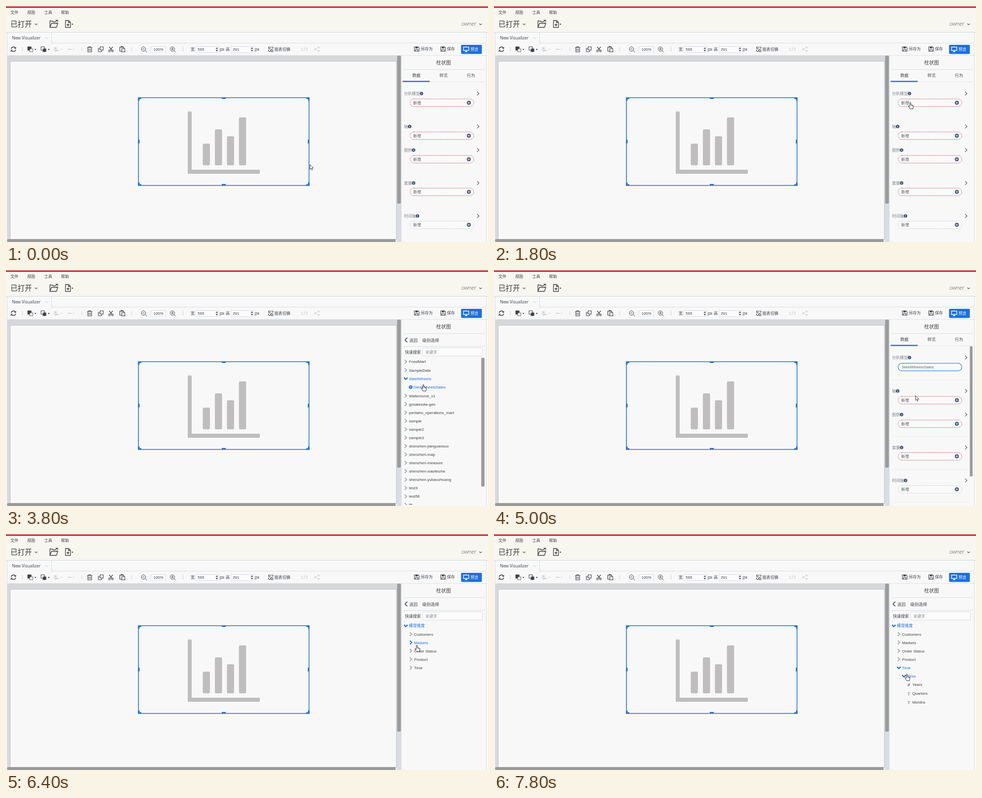
An HTML page that plays this animation: 976 px wide and 480 px high, repeating every 8 s.

```html
<!DOCTYPE html>
<html lang="zh-CN">
<head>
<meta charset="utf-8">
<title>New Visualizer</title>
<style>
html, body { margin: 0; width: 100%; height: 100%; overflow: hidden; background: #f8f8f8; }
svg { display: block; width: 976px; height: 480px; }
text { font-family: "Liberation Sans", "Noto Sans CJK SC", "Noto Sans CJK", sans-serif; white-space: pre; }
.os { font-family: "Open Sans", "Noto Sans CJK SC", sans-serif; }
</style>
</head>
<body>
<svg id="stage" viewBox="0 0 976 480">
  <defs><clipPath id="list"><rect x="801" y="176" width="170" height="302"/></clipPath></defs>
  <g id="base"></g>
  <g id="panel"></g>
  <g id="cursor"></g>
</svg>
<script>
const $ = id => document.getElementById(id);
const BLUE = '#1b6fe0', INK = '#3c3f45', PALE = '#d9dde2', GREY = '#9b9b9b', NAVY = '#3f4f70';

// Drawing helpers
const rect = (x, y, w, h, fill, more = '') =>
  `<rect x="${x}" y="${y}" width="${w}" height="${h}" fill="${fill}" ${more}/>`;
const path = (d, stroke, width = 1, fill = 'none', more = '') =>
  `<path d="${d}" stroke="${stroke}" stroke-width="${width}" fill="${fill}" ${more}/>`;
const text = (x, mid, s, size = 8, fill = INK, more = '') =>
  `<text x="${x}" y="${mid + size * 0.37}" font-size="${size}" fill="${fill}" ${more}>${s}</text>`;
const at = (x, y, body) => `<g transform="translate(${x} ${y})">${body}</g>`;
const caret = (x, y, c = INK) => path(`M${x - 2} ${y - 1}h4l-2 2.4z`, 'none', 0, c);
const vee = (x, y) => path(`M${x - 2.5} ${y - 1.2}l2.5 2.5l2.5 -2.5`, INK, 1.1);
const right = (x, y, c, w = 2) => path(`M${x - 2} ${y - 3.7}l3.7 3.7l-3.7 3.7`, c, w);
const down = (x, y) => path(`M${x - 3.6} ${y - 1.8}l3.6 3.6l3.6 -3.6`, BLUE, 2.2);
const middle = 'text-anchor="middle"';

function floppy(x, y) {
  return at(x, y,
    path('M-4.5 -4.5h7.5l2 2v7h-9.5z', INK, 1.1) +
    rect(-2.3, -4.5, 4.6, 3.2, INK) + path('M-2.5 4.5v-3.4h5v3.4', INK));
}

function zoom(x, y, plus) {
  return at(x, y,
    `<circle cx="-1" cy="-1" r="4.4" fill="none" stroke="${INK}"/>` +
    path('M2.2 2.2l3.6 3.6M-3.2 -1h4.4' + (plus ? 'M-1 -3.2v4.4' : ''), INK));
}

function sizeBox(x, value) {
  return rect(x, 82.5, 47, 12, '#fbfbfb', `stroke="${PALE}"`) + text(x + 3.5, 88.4, value) +
    path(`M${x + 40} 87h5l-2.5 -2.8zM${x + 40} 89.6h5l-2.5 2.8z`, 'none', 0, INK);
}

function header() {
  return rect(0, 0, 976, 480, '#f8f8f8') + rect(0, 4, 976, 48, '#f7f6ef') + rect(0, 1, 976, 2.6, '#c0141a') +
    ['文件', '视图', '工具', '帮助'].map((s, i) => text([9, 43, 77.5, 111.5][i], 13, s)).join('') +
    text(9, 37, '已打开', 14.5, '#303338') + vee(61, 37) +
    at(97, 37,
      path('M-8 6.5v-13h5l1.5 2h4M-8 6.5l3.2 -8h12.8l-3 8zM5.5 -1.5v-2', INK, 1.3) +
      path('M1.5 -4l5.5 -4M3.6 -8.2h4v4', INK, 1.3)) +
    at(125.5, 36.5,
      path('M-5 -7h6l4 4v10h-10zM1 -7v4h4', INK, 1.3) + path('M-2.6 1.8h5.2M0 -0.8v5.2', INK, 1.4)) +
    caret(134.5, 37) +
    text(952.5, 36, 'owner', 10.8, '#50535a', 'class="os" font-weight="300" text-anchor="end"') + vee(961, 37) +
    path('M0 53.5H976', '#cfd6de', 1.2) + path('M2.5 54V480M972.5 54V480', PALE) +
    path('M92.5 54V75.5H972', PALE) +
    text(12, 65, 'New Visualizer', 8.55, INK, 'class="os"') + path('M80 63l4 4m0 -4l-4 4', '#c9ccd0', 0.8);
}

function toolbar() {
  const seps = [33, 153, 254, 358].map(x => path(`M${x}.5 83.5v9`, '#cfd2d6')).join('');
  const layer = (x, front) => at(x, 88,
    rect(-5, -5, 7, 7, front ? INK : 'none', `stroke="${INK}"`) +
    rect(-1, -1, 6, 6, front ? '#f8f8f8' : INK, `stroke="${INK}" stroke-width="0.8"`));
  const refresh = at(15, 88,
    path('M-4.6 -0.8a4.7 4.7 0 0 1 8.3 -2.2M4.6 0.8a4.7 4.7 0 0 1 -8.3 2.2', INK, 1.5) +
    path('M5.3 -5.2v4h-4zM-5.3 5.2v-4h4z', 'none', 0, INK));
  const trash = at(169.5, 88,
    path('M-5 -3.5h10M-2 -3.5v-1.8h4v1.8M-3.8 -3.5v8.8h7.6v-8.8M-1.4 -1.2v4.4M1.4 -1.2v4.4', INK, 1.1));
  const copy = at(192, 88, path('M-1.5 -5h6.5v6.5h-6.5zM-1.5 -1.5h-3.5v6.5h6.5v-3.5', INK, 1.1));
  const cut = (x, y) => at(x, y,
    path('M-3.6 -5L2.4 2.2M3.6 -5L-2.4 2.2', INK, 1.2) +
    [-3, 3].map(cx => `<circle cx="${cx}" cy="3.4" r="1.8" fill="none" stroke="${INK}" stroke-width="1.1"/>`).join(''));
  const paste = at(235.5, 88,
    path('M-1.5 4h-3.5v-8.5h8v2.5', INK, 1.2) + rect(-3, -6, 4, 2.4, INK) + path('M-1 -1.5h6v7h-6z', INK, 1.1));
  const swap = at(536, 88,
    path('M-4.5 -4.5h3.5v3.5h-3.5zM1 -4.5h3.5v3.5M-4.5 1v3.5h3.5', INK) +
    path('M-3 4.5l6 -6M0.5 1.5h4v3.5h-4z', INK));
  const faint = '#d3d7dc';
  const code = path('M601 85l-3 3l3 3M607.5 85l3 3l-3 3M605.5 84l-2.5 8', faint, 1.1);
  const share = path('M632.5 84.5l-6.5 3.5l6.5 3.5', faint) + [[633, 84.5], [626, 88], [633, 91.5]]
    .map(([x, y]) => `<circle cx="${x}" cy="${y}" r="1.8" fill="${faint}"/>`).join('');
  const align = rect(97.5, 84, 5, 4, faint) + rect(97.5, 89, 9, 3, faint) + caret(112, 88.5, faint) +
    rect(125, 87, 8, 2, faint) + caret(137, 88.5, faint);
  const preview = rect(921.5, 79, 42, 18.5, BLUE, 'rx="2"') +
    path('M926.5 83.5h10.5v7h-10.5zM929.5 93h4.5M931.7 90.5v2.5', '#fff', 1.4) +
    text(940.5, 88, '预览', 8, '#fff');
  return seps + refresh + layer(49, true) + caret(59.5, 88.5) + layer(76, false) + caret(86.5, 88.5) + align +
    trash + copy + cut(212.5, 88) + paste + zoom(279.5, 88.5, false) +
    rect(293.5, 82.5, 30, 11.5, '#fbfbfb', `stroke="${PALE}"`) + text(308.7, 88.3, '100%', 8, INK, middle) +
    zoom(338, 88.5, true) + text(374, 88, '宽') + sizeBox(384.5, '565') + text(433, 88, 'px', 8.6) +
    text(445, 88, '高') + sizeBox(455.5, '291') + text(504, 88, 'px', 8.6) +
    swap + text(543.5, 88, '图表切换', 8.1) + code + share +
    floppy(831.5, 87.5) + text(840, 87.5, '另存为') + floppy(885, 87.5) + text(893, 87.5, '保存') + preview +
    path('M2 100.8H972', '#d3d7dc');
}

function canvas() {
  const fill = '#bfbdbd';
  const bars = [[398.5, 280], [423, 251], [447.3, 265], [471.7, 226.5]]
    .map(([x, y]) => rect(x, y, 14.5, 324 - y, fill, 'rx="2.5"')).join('');
  const handles = path('M269 192.5v-5h5M608 187.5h5v5M613 359v5h-5M274 364h-5v-5', BLUE, 3) +
    path('M437 187.5h8M437 363.6h8M269 272v7.5M612.6 272v7.5', BLUE, 3);
  return rect(2, 101, 789, 11.5, '#d5d7db') + rect(2, 112, 6.5, 362, '#d9dade') +
    rect(8.5, 112.5, 782, 362, '#f8f8f8', 'stroke="#bfc3c8"') +
    rect(791, 101, 9, 379, '#d9dee4') + rect(792, 101, 7.5, 301, GREY, 'rx="2"') +
    rect(2, 474, 787, 6, GREY, 'rx="2"') +
    rect(368, 214.5, 8, 126.5, fill, 'rx="2"') + rect(368, 333, 146, 8.3, fill, 'rx="2"') + bars +
    rect(268.2, 186.5, 345.4, 178.4, 'none', `stroke="${BLUE}" stroke-width="1.5"`) + handles +
    rect(800, 101, 172, 379, '#f8f8f8') + path('M800.5 101V480', PALE) +
    text(886, 115, '柱状图', 10, INK, middle) + path('M804 129.5H970', PALE);
}

// Property form; `model` is the chosen data model, if any
function form(model) {
  const sections = [['分析模型', 178, 196.7], ['轴', 245, 263.7], ['图例', 293, 311.7], ['度量', 360, 378], ['时间轴', 427, 445]];
  let out = [['数据', 831], ['样式', 886], ['行为', 941.5]]
    .map(([s, x]) => text(x, 141, s, 8.2, INK, middle)).join('') +
    path('M804 154.5H970', '#e3e6ea') + rect(803, 152.3, 55, 2.2, '#2463bd');
  sections.forEach(([label, y, mid], i) => {
    const dy = model && i ? 1 : 0, done = model && !i;
    const ix = 806 + label.length * 8 + 3.3;
    const edge = done ? `stroke="#3d8fe0" stroke-width="1.3"`
      : `stroke="${i < 4 ? '#cb4a58' : '#c6c9ce'}" stroke-width="0.9" stroke-dasharray="2.2 1.3"`;
    let body = text(806, y, label, 8, '#7d8087') +
      `<circle cx="${ix}" cy="${y}" r="3.5" fill="${NAVY}"/>` + path(`M${ix} ${y - 2}v1M${ix} ${y - 0.4}v2.4`, '#fff', 1.1) +
      right(956, y, '#70757e', 1.5) +
      rect(818.3, mid - 7.6 + (done ? 0.6 : 0), 129, 15.4, '#fafafa', `rx="7.7" ${edge}`);
    body += done ? text(825.5, 197.3, model, 8, '#5c6066')
      : text(824.5, mid, '新增', 8, '#55585f') + `<circle cx="937.2" cy="${mid}" r="4" fill="${NAVY}"/>` +
        path(`M934.9 ${mid}h4.6M937.2 ${mid - 2.3}v4.6`, '#fff', 1.1);
    out += at(0, dy, body);
  });
  if (model) {
    out += path('M806 223.5H960M806 338.5H960M806 405.5H960M806 472.5H960', '#eceef0') +
      rect(963.5, 155, 5.5, 265, GREY, 'rx="2.5"');
  }
  return out;
}

// Tree rows: [label, depth, state], state is '+' closed, '-' open, or a leaf icon
function tree(rows, tipY, thumb) {
  let top = 178, body = '';
  for (const [label, depth, state] of rows) {
    const branch = state === '+' || state === '-', h = branch ? 17.06 : 18, mid = top + h / 2;
    const hot = state === '-' || (tipY >= top && tipY < top + h);
    const x = 816 + depth * 10.3 - (branch || depth > 1 ? 0 : 1), ix = x - 6.5;
    if (state === '+') body += right(ix, mid, hot ? BLUE : '#a9acb1');
    else if (state === '-') body += down(ix, mid);
    else if (state === 'cube') body += at(819.5, mid,
      path('M0 -4l3.6 1.7v4.4l-3.6 1.9l-3.6 -1.9v-4.4z', 'none', 0, BLUE) + path('M-2.4 -1.9l2.4 1.1l2.4 -1.1M0 -0.8v3.6', '#fff', 0.8));
    else body += text(x - 7, mid, state, 9, '#4a5d7c',
      middle + (state === 'T' ? ' style="font-family:Liberation Serif,serif"' : ' font-weight="bold"'));
    body += text(x, mid, label, 8, hot ? BLUE : INK);
    top += h;
  }
  return path('M812.5 137.5l-4.5 4.8l4.5 4.8', INK, 1.5) + text(817, 142.5, '返回', 8.2) + text(843, 142.5, '级别选择', 8.5) +
    path('M804 155.5H970', PALE) + text(808, 167, '快速搜索') +
    rect(843.5, 158.5, 121, 16.5, '#fbfbfb', `stroke="${PALE}" rx="1.5"`) + text(849, 167, '关键字', 8, '#85888e') +
    `<g clip-path="url(#list)">${body}</g>` + (thumb ? rect(962.3, 178.5, 6.7, thumb, GREY, 'rx="2.5"') : '');
}

const models = ['FoodMart', 'SampleData', 'SteelWheels', 'Wafermove_v1', 'gosalesdw-geo', 'pentaho_operations_mart',
  'sample', 'sample2', 'sample3', 'shenzhen-jianguansuo', 'shenzhen-map', 'shenzhen-measure', 'shenzhen-xiaofeizhe',
  'shenzhen-yubaozhuang', 'test3', 'test56', 'ttt', '测试模型1'];

function modelRows(open) {
  const rows = models.map(s => [s, 0, '+']);
  if (open) rows.splice(2, 1, ['SteelWheels', 0, '-'], ['SteelWheelsSales', 1, 'cube']);
  return rows;
}

function dimensionRows(level) {
  if (!level) return [['模型维度', 0, '+']];
  const rows = [['模型维度', 0, '-'], ...['Customers', 'Markets', 'Order Status', 'Product', 'Time'].map(s => [s, 1, '+'])];
  if (level > 1) { rows[5][2] = '-'; rows.push(['Time', 2, level > 2 ? '-' : '+']); }
  if (level > 2) rows.push(['Years', 3, '#'], ['Quarters', 3, 'T'], ['Months', 3, 'T']);
  return rows;
}

// Pointer stops: [ms, x, y]
const stops = [[0, 615, 322], [200, 615, 322], [1400, 843, 196], [2600, 843, 196], [3000, 843, 216], [3200, 843, 216],
  [3600, 845, 233], [4200, 845, 233], [4800, 853, 255], [5000, 853, 255], [5400, 834, 260], [5600, 834, 260],
  [6000, 832, 186], [6200, 832, 188], [6400, 832, 226], [6800, 836, 267], [7000, 836, 267], [7400, 836, 285], [8000, 836, 285]];

function pointer(t) {
  const i = stops.findIndex(s => s[0] > t), [t0, x0, y0] = stops[i - 1], [t1, x1, y1] = stops[i];
  const k = (t - t0) / (t1 - t0), e = k * k * (3 - 2 * k);
  return [x0 + (x1 - x0) * e, y0 + (y1 - y0) * e];
}

const arrow = path('M0.5 0.5v9.6l2.2 -2l1.6 3.6l1.5 -0.7l-1.5 -3.5h3z', '#333', 0.9, '#fff');
const hand = path('M-1 0.8q1.1 -1.2 2.1 0v4.4l4 0.9q1.3 0.4 1.1 2l-0.8 3.4v1.7h-6l-3.2 -5.2q0.2 -1.6 1.6 -0.7l1.2 1.3z',
  '#333', 1, '#fff', 'stroke-linejoin="round"') + path('M2.9 5.6v2M4.6 6v1.8', '#333', 0.7);

function panelAt(t, y) {
  if (t < 2200) return form('');
  if (t < 3200) return tree(modelRows(false), y, 277);
  if (t < 4400) return tree(modelRows(true), y, 262);
  if (t < 5800) return form('SteelWheelsSales');
  return tree(dimensionRows(t < 6200 ? 0 : t < 7000 ? 1 : t < 7600 ? 2 : 3), y, 0);
}

const LOOP = 8000, STEP = 200;
let shown = -1;

function draw(t) {
  const [x, y] = pointer(t), isHand = (t >= 1400 && t < 4400) || t >= 5400;
  $('panel').innerHTML = panelAt(t, y);
  $('cursor').innerHTML = at(x, y, isHand ? hand : arrow);
}

function tick() {
  const t = Math.floor(performance.now() % LOOP / STEP) * STEP;
  if (t !== shown) draw(shown = t);
  requestAnimationFrame(tick);
}

$('base').innerHTML = header() + toolbar() + canvas();
tick();
</script>
</body>
</html>
```
